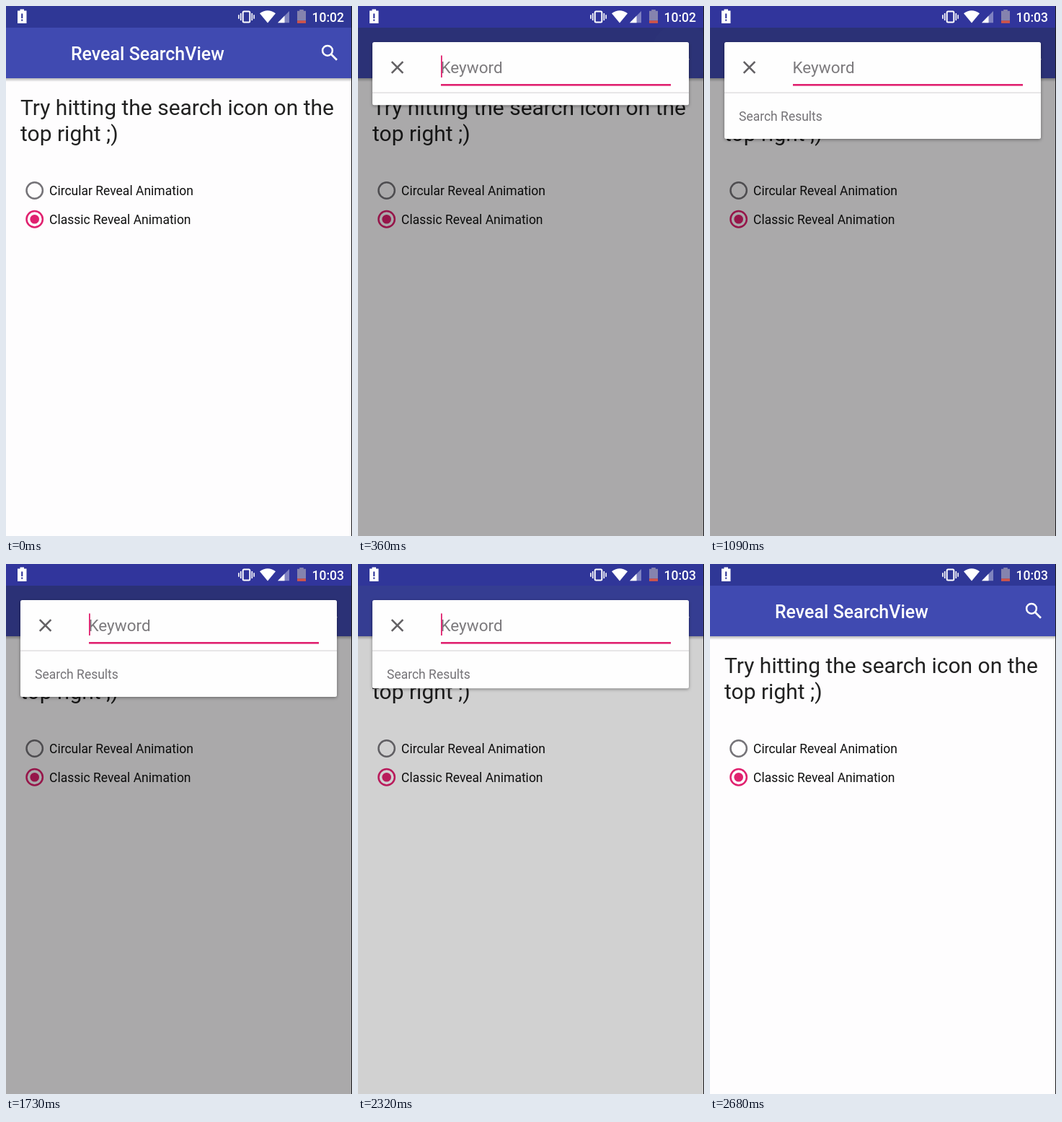
An HTML page with a canvas that plays this animation: 480 px wide and 734 px high, repeating every 2720 ms.

```html
<!DOCTYPE html>
<html lang="en">
<head>
<meta charset="utf-8">
<title>Reveal SearchView</title>
<style>
  html, body { margin: 0; width: 100%; height: 100%; overflow: hidden; background: #fefdfe; }
  canvas { display: block; width: 480px; height: 734px; }
</style>
</head>
<body>
<canvas id="stage" width="480" height="734"></canvas>
<script>
const W = 480, H = 734, LOOP = 2720;
const BAR_TOP = 30, BAR_BOTTOM = 100;
const CARD = { x: 20, y: 50, w: 439, h: 134 };
const OPEN = { start: 185, length: 430 };
const CLOSE = { start: 2170, length: 510 };
const PINK = '#e0216f';
const ctx = document.getElementById('stage').getContext('2d');

const clamp = v => Math.max(0, Math.min(1, v));
const ramp = (t, start, length) => clamp((t - start) / length);

function rect(x, y, w, h, color) {
  ctx.fillStyle = color;
  ctx.fillRect(x, y, w, h);
}

function shape(points, color) {
  ctx.fillStyle = color;
  ctx.beginPath();
  points.forEach(([x, y]) => ctx.lineTo(x, y));
  ctx.fill();
}

function lines(color, width, ...segments) {
  ctx.strokeStyle = color;
  ctx.lineWidth = width;
  ctx.beginPath();
  for (const [x1, y1, x2, y2] of segments) {
    ctx.moveTo(x1, y1);
    ctx.lineTo(x2, y2);
  }
  ctx.stroke();
}

function circle(x, y, r) {
  ctx.beginPath();
  ctx.arc(x, y, r, 0, Math.PI * 2);
}

function label(text, x, y, size, color, weight = 400) {
  ctx.font = `${weight} ${size}px Roboto, sans-serif`;
  ctx.fillStyle = color;
  ctx.fillText(text, x, y);
}

function shadowBelow(y, height, strength) {
  const g = ctx.createLinearGradient(0, y, 0, y + height);
  g.addColorStop(0, `rgba(0,0,0,${strength})`);
  g.addColorStop(1, 'rgba(0,0,0,0)');
  rect(0, y, W, height, g);
}

function statusBar(t, dim) {
  const mix = (a, b) => Math.round(a + (b - a) * dim);
  const color = `rgb(${mix(47, 49)},${mix(55, 53)},${mix(150, 156)})`;
  rect(0, 0, W, BAR_TOP, color);

  // battery warning
  rect(19.5, 4.5, 5.5, 3, '#fff');
  rect(16, 6.5, 12.5, 17.5, '#fff');
  rect(21.2, 10.5, 2.1, 6.5, color);
  rect(21.2, 18.5, 2.1, 2.2, color);

  // vibrate
  ctx.strokeStyle = '#fff';
  ctx.lineWidth = 2;
  ctx.beginPath();
  ctx.roundRect(328.7, 7.5, 9.6, 15, 1.5);
  ctx.stroke();
  lines('#fff', 1.6, [325.7, 10, 325.7, 20], [341.3, 10, 341.3, 20],
        [322.9, 12.2, 322.9, 17.8], [344.1, 12.2, 344.1, 17.8]);

  // wifi
  ctx.fillStyle = '#fff';
  ctx.beginPath();
  ctx.moveTo(363, 23.5);
  ctx.lineTo(352, 10.2);
  ctx.quadraticCurveTo(363, 2.3, 374, 10.2);
  ctx.fill();

  // signal
  shape([[377, 23.3], [393, 23.3], [393, 7]], 'rgba(255,255,255,.38)');
  shape([[377, 23.3], [386.5, 23.3], [386.5, 13.6]], '#fff');

  // low battery
  rect(407.2, 5, 5.6, 2.2, '#8583ae');
  rect(404, 6.8, 12, 13.4, '#8583ae');
  rect(404, 20.2, 12, 3.6, '#d25549');

  label(t < 800 ? '10:02' : '10:03', 424.5, 21.5, 17.5, '#fff', 500);
}

function toolbar(t) {
  rect(0, BAR_TOP, W, BAR_BOTTOM - BAR_TOP, '#404ab1');
  label('Reveal SearchView', 90, 75, 25, '#fff', 500);

  const ripple = ramp(t, 85, 80) * (1 - ramp(t, 200, 200));
  if (ripple > 0) {
    ctx.save();
    ctx.beginPath();
    ctx.rect(0, BAR_TOP, W, BAR_BOTTOM - BAR_TOP);
    ctx.clip();
    circle(448, 65, 41);
    ctx.fillStyle = `rgba(255,255,255,${0.07 * ripple})`;
    ctx.fill();
    ctx.restore();
  }

  ctx.strokeStyle = '#fff';
  ctx.lineWidth = 2.5;
  circle(446, 61.8, 6.9);
  ctx.stroke();
  lines('#fff', 2.7, [451, 66.8, 459, 74.8]);
}

function radio(y, text, checked) {
  ctx.strokeStyle = checked ? PINK : '#757378';
  ctx.lineWidth = 2.5;
  circle(39.7, y, 11.2);
  ctx.stroke();
  if (checked) {
    circle(39.7, y, 6.3);
    ctx.fillStyle = PINK;
    ctx.fill();
  }
  label(text, 60, y + 6.5, 17.5, '#101010');
}

function page() {
  rect(0, BAR_BOTTOM, W, H - BAR_BOTTOM, '#fefdfe');
  shadowBelow(BAR_BOTTOM, 5, 0.28);
  label('Try hitting the search icon on the', 20, 151, 30, '#212121');
  label('top right ;)', 20, 186.5, 30, '#212121');
  radio(255.5, 'Circular Reveal Animation', false);
  radio(295.3, 'Classic Reveal Animation', true);
}

function cardHeight(t) {
  const opened = 1 - (1 - ramp(t, OPEN.start, OPEN.length)) ** 2;
  const closed = ramp(t, CLOSE.start, CLOSE.length) ** 2;
  return CARD.h * (opened - closed);
}

function card(t) {
  const { x, y, w } = CARD;
  const h = cardHeight(t);
  if (h < 0.5) return;

  ctx.save();
  ctx.shadowColor = 'rgba(0,0,0,.4)';
  ctx.shadowBlur = 4;
  ctx.shadowOffsetY = 1.3;
  ctx.fillStyle = '#fefefe';
  ctx.beginPath();
  ctx.roundRect(x, y, w, h, Math.min(2.5, h / 2));
  ctx.fill();
  ctx.restore();

  ctx.save();
  ctx.clip();
  lines('#636164', 2.6, [46.8, 77.2, 62.4, 92.8], [46.8, 92.8, 62.4, 77.2]);
  label('Keyword', 114.5, 93, 22.5, '#7c7a7d');
  rect(115, 108, 319, 2.6, PINK);
  // cursor blinks every half second
  if (Math.floor((t - 250) / 500) % 2 === 0) rect(115, 68.5, 1.8, 30.5, PINK);
  rect(x, 119.5, w, 1.2, '#d9d8da');
  if (h > 121) label('Search Results', 40, 159, 17.5, '#757377');
  ctx.restore();
}

function draw(t) {
  const dim = ramp(t, 85, 95) - ramp(t, 2238, 175);
  toolbar(t);
  page();
  rect(0, BAR_TOP, W, H - BAR_TOP, `rgba(0,0,0,${0.333 * dim})`);
  statusBar(t, dim);
  card(t);
  rect(479, 0, 1, H, '#1c1b1e');
}

const begin = performance.now();
function tick() {
  draw((performance.now() - begin) % LOOP);
  requestAnimationFrame(tick);
}
tick();
</script>
</body>
</html>
```
